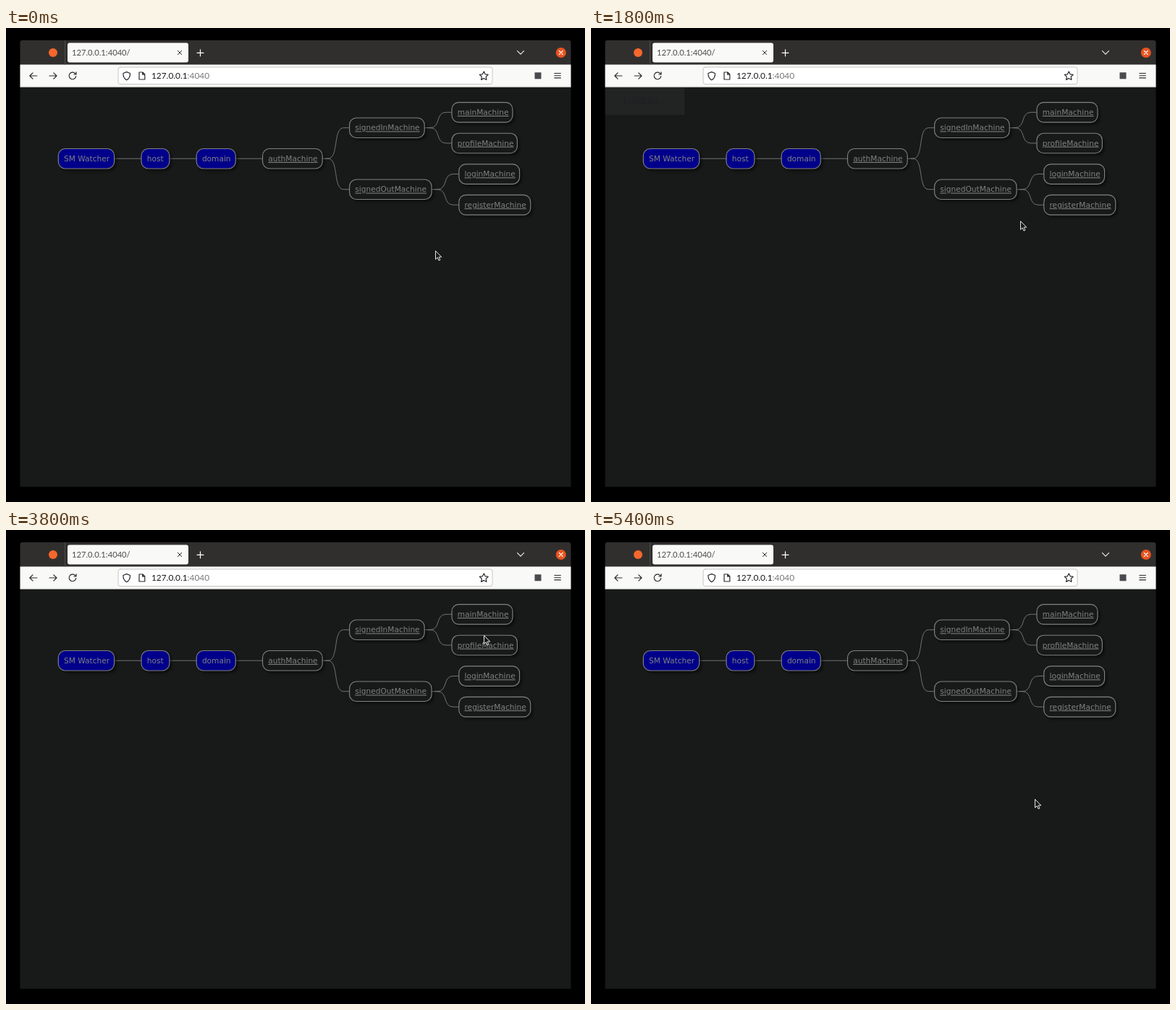
Recreate the animation shown at these times as an HTML page. Size 800 by 654 pixels, loop 5.8 s.

```html
<!DOCTYPE html>
<html lang="en">
<head>
<meta charset="utf-8">
<title>State machine watcher</title>
<style>
html, body { margin: 0; width: 100%; height: 100%; overflow: hidden; background: #000; }
svg { display: block; width: 800px; height: 654px; }
.ui { font-family: Lato, "Open Sans", sans-serif; }
.doc { font-family: "DejaVu Sans", sans-serif; font-size: 10.6px; fill: #808281; }
.serif { font-family: "DejaVu Serif", "Noto Serif", serif; font-size: 12px; }
.node rect { filter: drop-shadow(3px 3px 1.5px rgba(0, 0, 0, .45)); }
.icon { fill: none; stroke: #2c2c30; stroke-width: 1.2; stroke-linecap: round; stroke-linejoin: round; }
.hidden { display: none; }
</style>
</head>
<body>
<svg id="stage" viewBox="0 0 800 654">
  <defs>
    <linearGradient id="tabFade" gradientUnits="userSpaceOnUse" x1="212" x2="236" y1="0" y2="0">
      <stop offset="0" stop-color="#4b4b4d"/>
      <stop offset="1" stop-color="#4b4b4d" stop-opacity="0"/>
    </linearGradient>
    <clipPath id="tabClip"><rect x="85" y="20.5" width="167" height="27"/></clipPath>
  </defs>
  <rect width="800" height="654"/>
  <path d="M19.5 81V20q0-3 3-3H777.5q3 0 3 3V81Z" fill="#312f2e"/>
  <rect x="19.5" y="81" width="761" height="552" fill="#181a19"/>
  <rect x="19.5" y="50.5" width="761" height="31" fill="#f9f9f7"/>
  <path d="M19.5 81.2H780.5" stroke="#c9c9c7" stroke-width=".8"/>
  <path d="M81.5 17V50.5" stroke="#4d4b49"/>
  <circle cx="65" cy="34" r="6" fill="#f5672c"/>
  <rect x="85" y="20.5" width="167" height="27" rx="3" fill="#f9f9f7"/>
  <circle id="burst" cx="97" cy="34" r="12.5" fill="#a3cef8" clip-path="url(#tabClip)"/>
  <text id="tabText" class="ui" x="91" y="38.2" font-size="11.2" fill="url(#tabFade)"></text>
  <g class="icon">
    <path d="M237.3 31.3l5.4 5.4m0-5.4l-5.4 5.4" stroke-width="1"/>
    <path d="M264 34.3h9m-4.5-4.5v9" stroke="#fff"/>
    <path d="M706.5 31.7l4.5 4.5 4.5-4.5" stroke="#eee"/>
    <circle cx="766.8" cy="34" r="7" fill="#e95420" stroke="none"/>
    <path d="M764.3 31.5l5 5m0-5l-5 5" stroke="#fff" stroke-width="1.1"/>
    <path d="M42.8 66H32.8m4.2-4.2l-4.2 4.2 4.2 4.2"/>
    <path id="forward" d="M60 66H70m-4.2-4.2L70 66l-4.2 4.2"/>
    <path d="M96.7 66.6a4.8 4.8 0 1 1-1.5-4.2l1.4 1.3M97 60.8v3.2h-3.2"/>
    <rect x="155" y="54" width="517" height="23.5" rx="3" fill="#fff" stroke="#c6c6c5" stroke-width="1"/>
    <path d="M166.7 60.6l4.8 1.9c.2 4.4-1.4 7.4-4.8 9.3-3.4-1.9-5-4.9-4.8-9.3Z"/>
    <path d="M184 61h4.8l3 3v7h-7.8Zm4.6.2v3h3"/>
    <path d="M660.3 60l1.8 3.8 4.1.6-3 2.9.7 4.1-3.6-2-3.7 2 .7-4.1-3-2.9 4.1-.6Z"/>
    <path d="M757.8 62.5h8.6m-8.6 3.2h8.6m-8.6 3.2h8.6" stroke-width="1.1"/>
  </g>
  <rect x="730.5" y="61.3" width="9" height="9" fill="#4a4a4e"/>
  <text class="ui" x="201" y="70.2" font-size="11.85" fill="#18181b">127.0.0.1<tspan id="urlRest" fill="#77777a"></tspan></text>

  <g id="pages" class="doc"></g>

  <g id="rendered" class="serif"><text x="400" y="99" text-anchor="middle" fill="#000">RENDERED</text></g>
  <g id="loading" class="serif">
    <rect x="19.5" y="81.5" width="109.5" height="38.5" fill="#9a9c98"/>
    <text x="43.8" y="105" fill="#3a559c">Loading...</text>
  </g>
  <g id="status" class="ui">
    <rect x="19.5" y="616" height="17" fill="#f9f9fa"/>
    <text x="24" y="628.3" font-size="11" fill="#444448"></text>
  </g>
  <path id="arrow" d="M.5.5V12.2L3.2 9.7 5 13.8 6.9 13 5.1 9H8.8Z" fill="#1a1a1a" stroke="#e6e6e6" stroke-width="1"/>
  <path id="hand" d="M-1 7V.8q1-1.4 2 0V5l5 1.2q1.2.4 1 2L6 13H0L-4 8.4q.6-1.6 2-.6Z" fill="#1a1a1a" stroke="#e6e6e6" stroke-width="1"/>
  <path id="beam" d="M-2.5-5.5Q0-5.5 0-4 0-5.5 2.5-5.5M0-4.5V4.5M-2.5 5.5Q0 5.5 0 4 0 5.5 2.5 5.5" fill="none" stroke="#eee" stroke-width="1.4"/>
</svg>
<script>
const LOOP = 5800, STEP = 100;
const GRAY = '#808281', BLUE = '#02b3f2', RED = '#8e0b0d', DARK = '#181a19';
const $ = id => document.getElementById(id);

const attrs = o => Object.entries(o).map(([k, v]) => ` ${k}="${v}"`).join('');
const tag = (name, o, body = '') => `<${name}${attrs(o)}>${body}</${name}>`;
const text = (x, y, s, o = {}) => tag('text', { x, y, ...o }, s);
const line = (d, stroke = GRAY, o = {}) => tag('path', { d, stroke, fill: 'none', 'stroke-width': .85, ...o });
const box = (x, y, width, height, o) =>
  tag('rect', { x, y, width, height, rx: 9.5, stroke: GRAY, 'stroke-width': 1.15, fill: DARK, ...o });

// Home: mind map
const node = (x, cy, w, s, root) => tag('g', { class: 'node' },
  box(x, cy - 13.7, w, 27.5, { fill: root ? '#00008b' : DARK }) +
  text(x + 7.7, cy + 3.7, s, root ? {} : { 'text-decoration': 'underline' }));

const branch = (x, y, x2, y2) =>
  line(`M${x} ${y}H${x + 8}C${x + 23} ${y} ${x2 - 23} ${y2} ${x2 - 8} ${y2}H${x2}`);

const home =
  line('M149.5 180.2H187M226 180.2H263M317 180.2H354.5') +
  branch(437, 180.2, 474.5, 137.7) + branch(437, 180.2, 474.5, 222.7) +
  branch(578, 137.7, 616, 116.3) + branch(578, 137.7, 616, 158.9) +
  branch(588, 222.7, 626, 201.5) + branch(588, 222.7, 626, 244.1) +
  node(72.3, 180.2, 77.3, 'SM Watcher', true) +
  node(187, 180.2, 38.8, 'host', true) +
  node(263.2, 180.2, 54, 'domain', true) +
  node(354.5, 180.2, 82.7, 'authMachine') +
  node(474.6, 137.7, 103.6, 'signedInMachine') +
  node(474.6, 222.7, 113.5, 'signedOutMachine') +
  node(616, 116.3, 84, 'mainMachine') +
  node(616, 158.9, 90.4, 'profileMachine') +
  node(625.8, 201.5, 83.8, 'loginMachine') +
  node(625.8, 244.1, 99, 'registerMachine');

// Machine pages: state charts
const blue = s => tag('tspan', { fill: BLUE, dx: 2.3 }, s);

const frame = (x, w, h, titleX, name, stroke = '#626463') => {
  const dash = { stroke, 'stroke-width': 1.1, 'stroke-dasharray': '5.3 5.3' };
  return box(x, 93, w, h, { ...dash, fill: 'none' }) +
    line(`M${x} 112.7H${x + w}`, stroke, dash) +
    text(titleX, 106.5, '(^)' + blue(name), { fill: BLUE });
};

const state = (x, y, w, title, { plus, fill = DARK, entry } = {}) =>
  box(x, y, w, 38.2, { fill }) + line(`M${x} ${y + 19.7}h${w}`, GRAY, { 'stroke-width': 1.15 }) +
  (entry
    ? text(x + w / 2, y + 13.7, title, { 'text-anchor': 'middle' }) + text(x + 3.8, y + 32.3, entry, { 'font-size': 9.1 })
    : text(x + 7.6, y + 13.7, title + (plus ? blue('(+)') : '')));

// A curve with an arrowhead turned along its last segment
const edge = (d, color = GRAY) => {
  const [ax, ay, bx, by] = d.match(/[\d.]+/g).slice(-4).map(Number);
  const turn = Math.atan2(by - ay, bx - ax) * 180 / Math.PI;
  return line(d, color) + tag('path', {
    d: 'M0 0L-7-3.1-4 0-7 3.1Z', fill: color, stroke: color, 'stroke-width': .6,
    transform: `translate(${bx} ${by}) rotate(${turn})`
  });
};

const start = x => tag('circle', { cx: x, cy: 128.6, r: 7.6, fill: GRAY }) + edge(`M${x} 136L${x} 163.5`);

const label = (x, y, lines, first = GRAY) => lines.split('|').map((s, i) =>
  text(x, y + i * 11.4, s, { 'text-anchor': 'middle', 'font-size': 9.85, fill: i ? GRAY : first })).join('');

const auth =
  frame(271, 258, 294.7, 357, 'authMachine', RED) + start(408.2) +
  state(311.5, 164.2, 193.5, 'S.init', { entry: 'entry / Set callbacks for auth change.' }) +
  state(316.5, 253.5, 99, 'S.signedOut', { plus: true, fill: '#7a1315' }) +
  state(321.5, 342.3, 89, 'S.signedIn', { plus: true }) +
  edge('M378 202.5C363 214 360 232 362 253') +
  edge('M431 202.5C443 219 457 252 458 277C459 313 440 338 411 351') +
  edge('M366 342L366 292') +
  edge('M316.5 282C295 290 280 303 281 318C282 333 302 347 321 353', BLUE) +
  label(404, 225.4, 'E.signOut|:T.toSignedOut') +
  label(490.7, 269.9, 'E.signIn|:T.toSignedIn') +
  label(318.2, 314.3, 'E.signIn|:T.toSignedIn', BLUE) +
  label(403, 314.3, 'E.signOut|:T.toSignedOut');

const signedIn =
  frame(232.5, 336, 211.7, 347, 'signedInMachine') + start(423.8) +
  state(389, 164.2, 69.5, 'S.main', { plus: true }) +
  state(241.2, 255.8, 105.5, 'S.confirmSignOut') +
  state(477.8, 255.8, 76.2, 'S.profile', { plus: true }) +
  edge('M389 186.3C340 190 277 201 273 224C271 235 274 244 281 255.5') +
  edge('M346.5 257.5C362 250 377 243 382 235C387 224 391 216 404 202.5') +
  edge('M433 202.5C441 217 449 234 456 241C462 247 468 251 477.5 256') +
  edge('M518 255.5C519 235 515 215 501 205C490 197 475 191 459 188.3') +
  edge('M346.5 266.5C355 268 360 271 360 275C360 279 355 281.5 347 283') +
  label(327.8, 225.4, 'E.intentSignOut|:T.toConfirmSignOut') +
  label(415.2, 225.4, 'E.cancel|:T.toMain') +
  label(483, 225.4, 'E.profile|:T.toProfile') +
  label(540, 225.4, 'E.back|:T.toMain') +
  label(409, 267, 'E.initiateSignOut|:T.initiateSignOut|{Initiate sign out}');

const main =
  frame(137.5, 525.7, 300.3, 356.5, 'mainMachine') + start(397.8) +
  state(316, 164.2, 163.5, 'S.check', { entry: 'entry / Check if email is verified.' }) +
  state(146.4, 255.8, 108.8, 'S.emailNotVerified') +
  state(198.5, 347.4, 50, 'S.error') +
  state(289.5, 347.4, 44.6, 'S.app') +
  edge('M357 202.5C325 218 280 237 241 255.5') +
  edge('M476 202C540 222 584 246 584 276C584 330 430 350 334.5 363') +
  edge('M255 271C264 271 269 272 269 275C269 278 264 279 255.5 279.5') +
  edge('M255 267.5C340 264 427 265 427 275C427 285 340 286 255.5 281.5') +
  edge('M180 294C165 311 163 326 170 337C177 347 188 353 198 357') +
  edge('M222 347C221 328 217 310 210.5 294') +
  edge('M236 294C256 307 280 328 297 347') +
  label(381, 225.4, 'E.emailNotVerified|:T.toEmailNotVerified') +
  label(348.5, 267, 'E.resendEmail|:T.resendEmail') +
  label(351, 289.8, '{Resending verification email.}') +
  label(491, 267, 'E.reload|:T.reload') +
  label(493, 289.8, '{Reloading user profile.}') +
  label(193.3, 319.4, 'E.error|:T.toError') +
  label(239, 319.4, 'E.back|:T.back') +
  label(321.8, 319.4, 'E.emailVerified|:T.toApp') +
  label(621, 272.8, 'E.emailVerified|:T.toApp');

const pages = { home, authMachine: auth, signedInMachine: signedIn, mainMachine: main };
$('pages').innerHTML = Object.entries(pages).map(([id, body]) => tag('g', { id }, body)).join('');

// Timeline
const visits = [
  [-1000, 'home'], [800, 'authMachine'], [1700, 'home'], [2300, 'signedInMachine'],
  [3300, 'home'], [4000, 'mainMachine'], [4900, 'home']
];
const hovers = [[500, 800, 'authMachine'], [2100, 2300, 'signedInMachine'], [3900, 4000, 'mainMachine']];
const pointer = [
  [100, 593, 307], [500, 410, 184], [600, 400, 180], [800, 400, 180], [1000, 587, 304],
  [1200, 587, 304], [1500, 593, 345], [1700, 593, 345], [1800, 593, 266], [2100, 535, 143],
  [2200, 528, 138], [2300, 528, 138], [2500, 629, 350], [2800, 629, 350], [3100, 669, 398],
  [3300, 669, 398], [3800, 660, 145], [3900, 657, 117], [4000, 657, 117], [4200, 658.5, 280],
  [4400, 658.5, 280], [4700, 613, 371]
];

const pointerAt = t => {
  const i = pointer.findIndex(p => p[0] > t);
  if (i < 0) return pointer[pointer.length - 1].slice(1);
  if (i === 0) return pointer[0].slice(1);
  const [t0, x0, y0] = pointer[i - 1], [t1, x1, y1] = pointer[i];
  const k = (t - t0) / (t1 - t0);
  return [x0 + (x1 - x0) * k, y0 + (y1 - y0) * k];
};

const show = (id, on) => $(id).classList.toggle('hidden', !on);
const path = page => page === 'home' ? '' : '/machine/page/host/domain/' + page;

function render(time) {
  const t = Math.floor(time % LOOP / STEP) * STEP;
  const [since, page] = visits.filter(v => v[0] <= t).pop();
  const age = t - since, blank = age < STEP, fading = !blank && age < 2 * STEP;

  for (const id in pages) show(id, id === page && !blank);
  show('rendered', blank);
  show('burst', blank);
  show('loading', blank || fading);
  $('loading').setAttribute('opacity', blank ? 1 : .08);

  $('tabText').textContent = '127.0.0.1:4040' + (page === 'home' ? '/' : '/machine/pag');
  $('urlRest').textContent = ':4040' + path(page);
  $('forward').style.stroke = page === 'home' ? '#2c2c30' : '#b9b9b9';

  const hover = hovers.find(h => t >= h[0] && t < h[1]);
  show('status', hover);
  if (hover) {
    const [panel, link] = $('status').children;
    link.textContent = '127.0.0.1:4040' + path(hover[2]);
    panel.setAttribute('width', link.getComputedTextLength() + 10);
  }

  const shape = hover ? 'hand' : t >= 4200 && t < 4500 ? 'beam' : 'arrow';
  for (const id of ['arrow', 'hand', 'beam']) show(id, id === shape);
  $(shape).setAttribute('transform', `translate(${pointerAt(t)})`);
}

const began = performance.now();
function tick() {
  render(performance.now() - began);
  requestAnimationFrame(tick);
}
tick();
</script>
</body>
</html>
```
